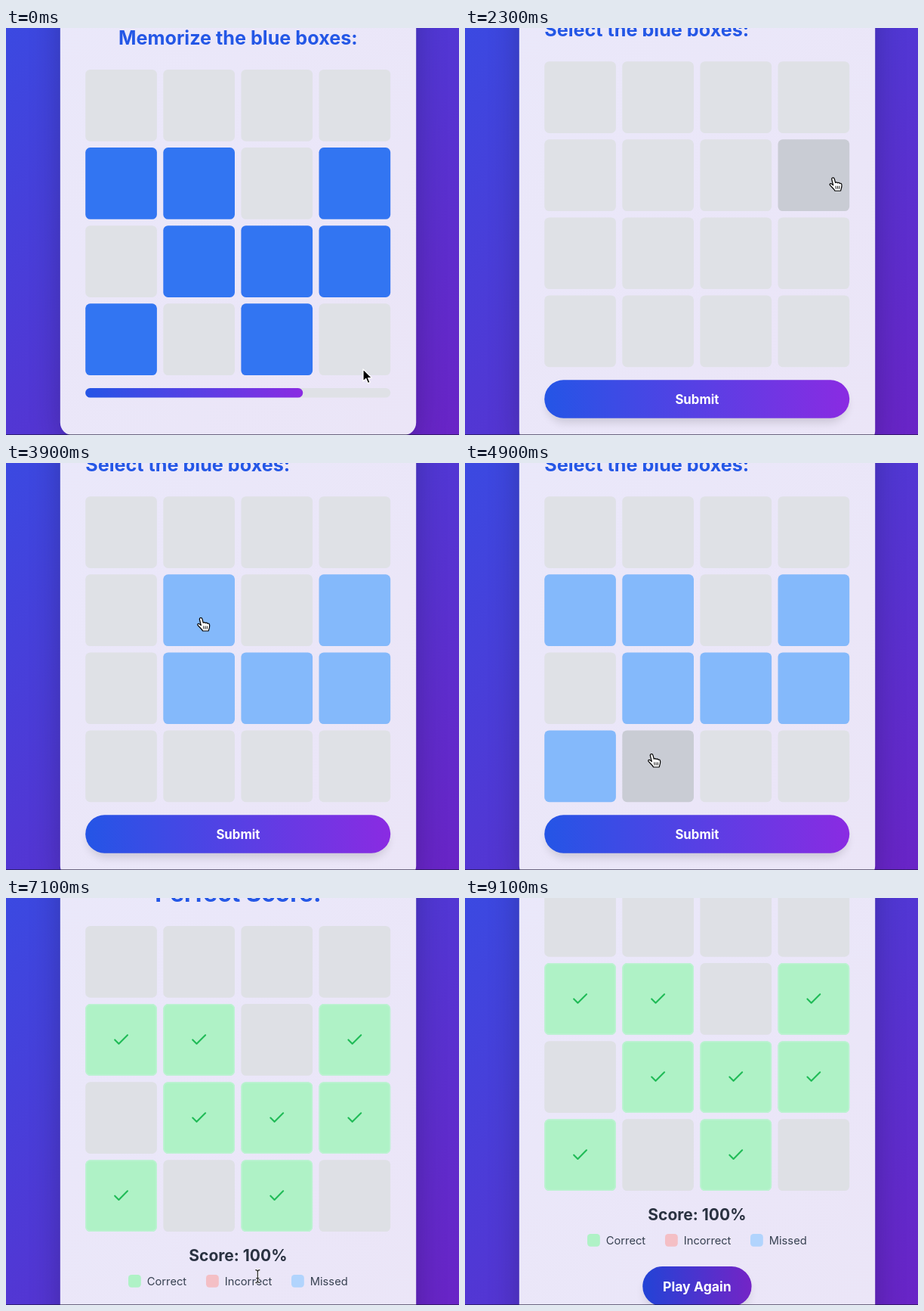
An HTML page for the animation above (9.2 s loop, 600 px wide and 538 px high).

```html
<!DOCTYPE html>
<html lang="en">
<head>
<meta charset="utf-8">
<title>Memory grid</title>
<style>
html, body { margin: 0; width: 100%; height: 100%; overflow: hidden; background: #5236d3; }
svg { display: block; width: 600px; height: 538px; }
text { font-family: Inter, "Liberation Sans", sans-serif; }
</style>
</head>
<body>
<svg id="stage" viewBox="0 0 600 538">
  <defs>
    <linearGradient id="page" x1="0" y1="0" x2="1" y2="1">
      <stop offset="0" stop-color="#3b49e1"/><stop offset="1" stop-color="#6924c6"/>
    </linearGradient>
    <linearGradient id="paper" x1="0" y1="0" x2="1" y2="1">
      <stop offset="0" stop-color="#eae8fa"/><stop offset="1" stop-color="#ebe5f7"/>
    </linearGradient>
    <linearGradient id="accent">
      <stop offset="0" stop-color="#2455e6"/><stop offset="1" stop-color="#8a2be2"/>
    </linearGradient>
    <linearGradient id="accentDark">
      <stop offset="0" stop-color="#2243d6"/><stop offset="1" stop-color="#7424c6"/>
    </linearGradient>
    <filter id="blurWide" filterUnits="userSpaceOnUse" x="-60" y="-400" width="720" height="1200">
      <feGaussianBlur stdDeviation="26"/>
    </filter>
    <filter id="blurSmall" x="-20%" y="-80%" width="140%" height="260%">
      <feGaussianBlur stdDeviation="6"/>
    </filter>
  </defs>
</svg>
<script>
const LOOP = 9200, STEP = 100;
const RECALL = 2200, RESULT = 5600;
const CELL = 94.7, PITCH = 103.1, LEFT = 105.2, WIDTH = 404, MID = 307.4;
const BLUE = [4, 5, 7, 9, 10, 11, 12, 14];
// cell index and the time it is picked
const PICKS = [[7, 2500], [11, 3000], [10, 3300], [9, 3600], [5, 3900], [4, 4200], [12, 4600], [14, 5200]];
// pointer path: time, x, y
const PATH = [
  [0, 473, 451], [400, 476, 430], [1100, 490, 215], [1500, 490, 200], [2200, 488, 197],
  [2600, 484, 205], [2900, 470, 284], [3000, 466, 290], [3300, 372, 292], [3600, 262, 286],
  [3900, 258, 205], [4200, 166, 200], [4600, 162, 384], [4900, 247, 385], [5200, 348, 394],
  [5500, 314, 490], [5800, 312, 500], [6400, 318, 501], [7200, 334, 500], [7700, 335, 495],
  [8500, 333, 499], [8800, 328, 517], [9000, 322, 533], [9100, 318, 550]
];

const stage = document.getElementById('stage');

function add(parent, tag, attrs) {
  const el = document.createElementNS('http://www.w3.org/2000/svg', tag);
  set(el, attrs);
  parent.appendChild(el);
  return el;
}
function set(el, attrs) {
  for (const k in attrs) el.setAttribute(k, attrs[k]);
}
function show(el, on) {
  el.setAttribute('display', on ? 'inline' : 'none');
}
function label(parent, str, x, y, size, weight, fill, anchor = 'middle') {
  const el = add(parent, 'text', { x, y, 'font-size': size, 'font-weight': weight, fill, 'text-anchor': anchor });
  el.textContent = str;
  return el;
}
function box(parent, x, y, width, height, rx, fill) {
  return add(parent, 'rect', { x, y, width, height, rx, fill });
}
function pill(parent, x, y, width, height) {
  const shade = box(parent, x + 3, y + 9, width - 6, height - 3, height / 2, '#000');
  set(shade, { opacity: 0.13, filter: 'url(#blurSmall)' });
  return box(parent, x, y, width, height, height / 2, 'url(#accent)');
}

box(stage, 0, 0, 600, 538, 0, 'url(#page)');
const shadow = box(stage, 84, -300, 447, 850, 16, '#000');
set(shadow, { opacity: 0.36, filter: 'url(#blurWide)' });
const card = box(stage, 71.8, -60, 471.4, 598.4, 16.8, 'url(#paper)');

// grid, shared by the three screens
const grid = add(stage, 'g', {});
const cells = Array.from({ length: 16 }, (_, i) => {
  const x = LEFT + (i % 4) * PITCH, y = Math.floor(i / 4) * PITCH;
  const rect = box(grid, x, y, CELL, CELL, 6.3, '#dfe1e6');
  const mark = add(grid, 'g', { transform: `translate(${x + CELL / 2 - 12.6} ${y + CELL / 2 - 12.6}) scale(1.05)` });
  if (BLUE.includes(i)) {
    add(mark, 'path', {
      d: 'M20 6 9 17l-5-5', fill: 'none', stroke: '#20bb57', 'stroke-width': 2,
      'stroke-linecap': 'round', 'stroke-linejoin': 'round'
    });
    const edge = box(mark, 0, 0, (CELL - 1.4) / 1.05, (CELL - 1.4) / 1.05, 5.4, 'none');
    set(edge, {
      x: 12 - (CELL - 1.4) / 2.1, y: 12 - (CELL - 1.4) / 2.1,
      stroke: '#bdf2d3', 'stroke-width': 1.4
    });
  }
  return { x, y, rect, mark };
});

const study = add(stage, 'g', {});
label(study, 'Memorize the blue boxes:', MID, 21.6, 25.2, 700, '#2457e6');
box(study, LEFT, 476, WIDTH, 12.6, 6.3, '#dfe1e6');
const bar = box(study, LEFT, 476, WIDTH, 12.6, 6.3, 'url(#accent)');

const recall = add(stage, 'g', {});
label(recall, 'Select the blue boxes:', LEFT, 10.8, 25.2, 700, '#2457e6', 'start');
pill(recall, LEFT, 465.3, WIDTH, 50.4);
label(recall, 'Submit', MID, 496.5, 16.8, 700, '#fff');

const result = add(stage, 'g', {});
label(result, 'Perfect Score!', MID, 4.6, 31.5, 700, '#2457e6');
label(result, 'Score: 100%', MID, 480.2, 21, 700, '#2a3241');
[['Correct', 162, '#aff2c6'], ['Incorrect', 265, '#f4bfc5'], ['Missed', 378, '#b1d4fd']].forEach(([name, x, fill]) => {
  box(result, x, 498, 16.8, 16.8, 4.2, fill);
  label(result, name, x + 24.8, 511.8, 14.7, 400, '#374151', 'start');
});
const again = add(result, 'g', {});
const againFace = pill(again, MID - 68.7, 542.2, 137.4, 50.4);
label(again, 'Play Again', MID, 573.4, 16.8, 700, '#fff');

box(stage, 0, 537, 600, 1, 0, 'rgba(24,18,50,.6)');

const pointers = {
  arrow: add(stage, 'g', {}),
  hand: add(stage, 'g', {}),
  beam: add(stage, 'g', {})
};
add(pointers.arrow, 'path', {
  d: 'M0 0V16L3.8 12.5 6.4 18.6 9.1 17.4 6.6 11.5H11.6Z',
  fill: '#000', stroke: '#fff', 'stroke-width': 1.2, 'stroke-linejoin': 'round'
});
add(pointers.hand, 'path', {
  d: 'M-1.7 1.5C-1.8-.8 1.4-1 2 1.3L3.2 6.2Q5.2 4.8 6 6.6 8.1 5.4 8.9 7.3 11.1 6.5 11.6 9C12 12 10.8 14 10.2 17H2.6C1.5 14.4-1.8 12.2-4 9.4-4.9 7.8-3 6.6-1.4 8.1L.3 9.6Z',
  fill: '#fff', stroke: '#000', 'stroke-width': 1.2, 'stroke-linejoin': 'round'
});
add(pointers.hand, 'path', { d: 'M3.6 10.5l.5 4M6 10.5l.3 4M8.4 10.5v4', stroke: '#000', 'stroke-width': 0.9 });
for (const [color, w] of [['#fff', 2.6], ['#222', 1.2]]) {
  add(pointers.beam, 'path', {
    d: 'M-3-8.5Q0-8.5 0-6 0-8.5 3-8.5M0-6V6M-3 8.5Q0 8.5 0 6 0 8.5 3 8.5M-2 2.5H2',
    fill: 'none', stroke: color, 'stroke-width': w
  });
}

const clamp = v => Math.max(0, Math.min(1, v));

function pointerAt(t) {
  let i = 0;
  while (i < PATH.length - 2 && PATH[i + 1][0] <= t) i++;
  const [t0, x0, y0] = PATH[i], [t1, x1, y1] = PATH[i + 1];
  const u = clamp((t - t0) / (t1 - t0)), e = u * u * (3 - 2 * u);
  return [x0 + (x1 - x0) * e, y0 + (y1 - y0) * e];
}

function cellColor(i, t, over) {
  if (t < RECALL) return BLUE.includes(i) ? '#3275f2' : '#dfe1e6';
  if (t >= RESULT) return BLUE.includes(i) ? '#aff2c6' : '#dee0e5';
  if (PICKS.some(([n, at]) => n === i && t >= at)) return '#84b9fb';
  return over ? '#c9ccd4' : '#dfe1e6';
}

function draw(t) {
  const [px, py] = pointerAt(t);
  const isResult = t >= RESULT, isStudy = t < RECALL;
  const scroll = isResult ? 54 * (1 - (1 - clamp((t - 7250) / 950)) ** 2) : 0;
  const top = isStudy ? 55 : isResult ? 37 - scroll : 44.2;

  show(study, isStudy);
  show(recall, !isStudy && !isResult);
  show(result, isResult);
  set(grid, { transform: `translate(0 ${top})` });
  set(result, { transform: `translate(0 ${-scroll})` });

  const bottom = isStudy ? 538.4 : isResult ? 626 - scroll : 549.4;
  set(card, { height: bottom + 60 });
  set(shadow, { height: bottom + 313 });

  let onCell = false;
  cells.forEach((c, i) => {
    const dx = px - c.x, dy = py - top - c.y;
    const over = dx >= 0 && dx < CELL && dy >= 0 && dy < CELL;
    onCell = onCell || over;
    set(c.rect, { fill: cellColor(i, t, over) });
    show(c.mark, isResult);
  });

  const left = Math.max(0, 288 - 0.132 * t);
  set(bar, { width: left, rx: Math.min(6.3, left / 2) });

  const hover = clamp((t - 8000) / 300);
  const scale = 1 + 0.05 * hover;
  set(again, { transform: `translate(${MID} 567.4) scale(${scale}) translate(${-MID} -567.4)` });
  set(againFace, { fill: hover > 0.5 ? 'url(#accentDark)' : 'url(#accent)' });

  let kind = 'arrow';
  if (isResult) kind = t < 7300 ? 'beam' : hover > 0 ? 'hand' : 'arrow';
  else if (!isStudy && (onCell || py > 465)) kind = 'hand';
  for (const k in pointers) show(pointers[k], k === kind);
  set(pointers[kind], { transform: `translate(${px} ${py})` });
}

const start = performance.now();
function tick() {
  const t = (performance.now() - start) % LOOP;
  draw(Math.floor(t / STEP) * STEP);
  requestAnimationFrame(tick);
}
draw(0);
requestAnimationFrame(tick);
</script>
</body>
</html>
```
